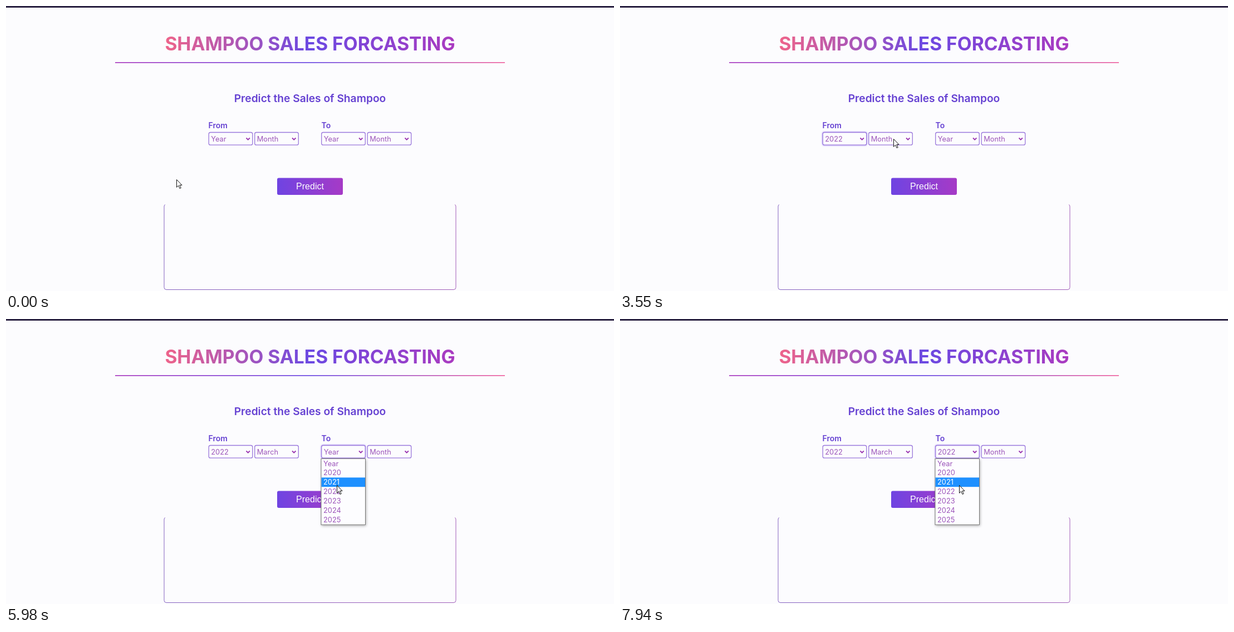
Write an HTML page that moves like this. It is 1092 px wide and 513 px high and loops after 7990 ms.

```html
<!DOCTYPE html>
<html lang="en">
<head>
<meta charset="utf-8">
<title>Sales forecast form</title>
<style>
html, body { margin: 0; width: 100%; height: 100%; overflow: hidden; background: #fcfcfe; }
svg { display: block; width: 1092px; height: 513px; font-family: Inter, sans-serif; }
.option { font-size: 12.8px; font-weight: 400; fill: #9c55ba; }
.label { font-size: 14px; font-weight: 600; fill: #6541d2; }
</style>
</head>
<body>
<svg id="stage" viewBox="0 0 1092 513" xmlns="http://www.w3.org/2000/svg">
  <defs>
    <linearGradient id="titleFill" gradientUnits="userSpaceOnUse" x1="285" x2="807" y1="0" y2="0">
      <stop offset="0" stop-color="#ef648a"/><stop offset=".5" stop-color="#6b49e2"/><stop offset="1" stop-color="#aa3bc0"/>
    </linearGradient>
    <linearGradient id="lineFill" gradientUnits="userSpaceOnUse" x1="196" x2="896" y1="0" y2="0">
      <stop offset="0" stop-color="#aa3bc0"/><stop offset=".5" stop-color="#6b49e2"/><stop offset="1" stop-color="#ef64a0"/>
    </linearGradient>
    <linearGradient id="buttonFill"><stop stop-color="#6f44e2"/><stop offset="1" stop-color="#a63ac6"/></linearGradient>
    <linearGradient id="frameLine" gradientUnits="userSpaceOnUse" x1="284" x2="808" y1="0" y2="0">
      <stop stop-color="#8462c0"/><stop offset="1" stop-color="#a05cb8"/>
    </linearGradient>
    <filter id="shadow" x="-20%" y="-20%" width="140%" height="140%">
      <feDropShadow dx="1" dy="2" stdDeviation="2.4" flood-color="#000" flood-opacity=".36"/>
    </filter>
    <filter id="glow" x="-20%" y="-50%" width="140%" height="200%"><feGaussianBlur stdDeviation="1"/></filter>
  </defs>
  <rect width="1092" height="513" fill="#fcfcfe"/>
  <rect width="1092" height="3" fill="#2e2645"/>
  <text x="546" y="80.3" text-anchor="middle" font-size="33.6" font-weight="700" fill="url(#titleFill)">SHAMPOO SALES FORCASTING</text>
  <rect x="196" y="101" width="700" height="1.7" fill="url(#lineFill)"/>
  <text x="546" y="173.2" text-anchor="middle" font-size="19.2" font-weight="600" fill="#6541d2">Predict the Sales of Shampoo</text>
  <text class="label" x="363.5" y="220.3">From</text>
  <text class="label" x="566.5" y="220.3">To</text>
  <g id="fields"></g>
  <rect x="487" y="309.5" width="118" height="30.5" rx="3" fill="url(#buttonFill)"/>
  <text x="546" y="330" text-anchor="middle" font-size="16" fill="#fff" style="font-family:'Liberation Sans',Arial,sans-serif">Predict</text>
  <path d="M286 357.5Q284 358 284 361V506.500Q284 510.500 288 510.500H804Q808 510.500 808 506.500V361Q808 358 806 357.500" fill="none" stroke="url(#frameLine)"/>
  <g id="popup"></g>
  <path id="cursor" d="M.5 .5V14.300L3.700 11.200L6 16.500L8.200 15.500L5.900 10.400H10Z" fill="#fff" stroke="#111" stroke-width="1" stroke-linejoin="miter"/>
</svg>
<script>
const NS = 'http://www.w3.org/2000/svg';
const LOOP = 7990, TOP = 251.3, ROW = 16.83;
const years = ['Year', '2020', '2021', '2022', '2023', '2024', '2025'];
const months = ['Month', 'January', 'February', 'March', 'April', 'May', 'June', 'July',
  'August', 'September', 'October', 'November', 'December'];

// time, x, y of the pointer
const path = [
  [130, 306, 312], [710, 408, 236], [880, 408, 236], [920, 407, 240], [1460, 407, 240],
  [1920, 402, 297], [2300, 402, 297], [2630, 404, 312], [2930, 404, 312], [3550, 491, 239],
  [3760, 491, 239], [4220, 488, 311], [4720, 488, 311], [5060, 581, 245], [5320, 592, 240],
  [5520, 592, 240], [5980, 594, 299], [6150, 594, 299], [6230, 595, 312], [6650, 595, 312],
  [7440, 611, 236], [7650, 611, 236], [7940, 609, 299]
];

// each time a list is open: which field, its starting row, the row chosen
const sessions = [
  { field: 0, open: 1420, close: 2930, start: 0, pick: 3 },
  { field: 1, open: 3720, close: 4720, start: 0, pick: 3 },
  { field: 2, open: 5480, close: 6650, start: 0, pick: 3 },
  { field: 2, open: 7610, close: LOOP, start: 3, pick: 3 }
];

function add(parent, tag, attrs, text) {
  const el = document.createElementNS(NS, tag);
  for (const k in attrs) el.setAttribute(k, attrs[k]);
  if (text) el.textContent = text;
  parent.appendChild(el);
  return el;
}

const show = (el, on) => el.setAttribute('visibility', on ? 'visible' : 'hidden');
const fieldLayer = document.getElementById('fields');
const popLayer = document.getElementById('popup');
const cursor = document.getElementById('cursor');

const fields = [364, 446.5, 566.5, 649].map((x, i) => {
  const items = i % 2 ? months : years;
  const box = { x: x + .2, y: 227.5, width: 78.6, height: 22.7, rx: 3 };
  const glow = add(fieldLayer, 'rect', { ...box, fill: 'none', stroke: '#8f70f0', 'stroke-width': 3, opacity: .5, filter: 'url(#glow)' });
  add(fieldLayer, 'rect', { ...box, fill: '#fcfcfe', stroke: '#9a78dc', 'stroke-width': 1.3 });
  const label = add(fieldLayer, 'text', { class: 'option', x: x + 4.3, y: 243.8 }, items[0]);
  add(fieldLayer, 'path', { d: `M${x + 67.5} 237.500l3.200 3.200l3.200-3.200`, fill: 'none', stroke: '#9a35b0', 'stroke-width': 1.8 });
  return { x, items, glow, label };
});

const lists = fields.slice(0, 3).map(f => {
  const g = add(popLayer, 'g', {});
  const height = ROW * f.items.length + 1;
  add(g, 'rect', { x: f.x - .5, y: TOP, width: 79.5, height, fill: '#fdfdff', filter: 'url(#shadow)' });
  const full = add(g, 'g', {});
  add(full, 'rect', { x: f.x - .5, y: TOP + .2, width: 79.5, height, fill: 'none', stroke: '#777' });
  const bar = add(full, 'rect', { x: f.x, width: 78.5, height: ROW, fill: '#1e90ff' });
  const rows = f.items.map((s, i) =>
    add(full, 'text', { class: 'option', x: f.x + 3.5, y: TOP + 13.3 + ROW * i }, s));
  return { g, full, bar, rows };
});

function pointer(t) {
  let i = 0;
  while (i < path.length - 1 && path[i + 1][0] <= t) i++;
  const a = path[i], b = path[i + 1] || a;
  const u = Math.min(1, Math.max(0, (t - a[0]) / (b[0] - a[0] || 1)));
  const e = u * u * (3 - 2 * u);
  return [a[1] + (b[1] - a[1]) * e, a[2] + (b[2] - a[2]) * e];
}

function draw(t) {
  const [x, y] = pointer(t).map(Math.round);
  cursor.setAttribute('transform', `translate(${x} ${y})`);

  const value = [0, 0, 0, 0];
  let focus = -1, live = null;
  for (const s of sessions) {
    if (t >= s.open) focus = s.field;
    if (t >= s.close) value[s.field] = s.pick;
    else if (t >= s.open) live = s;
  }
  fields.forEach((f, i) => {
    f.label.textContent = f.items[value[i]];
    show(f.glow, i === focus);
  });
  lists.forEach((l, i) => {
    const on = live && live.field === i;
    l.g.setAttribute('display', on ? 'inline' : 'none');
    if (!on) return;
    // the list appears blank for one step before its rows
    l.full.setAttribute('display', t < live.open + 40 ? 'none' : 'inline');
    const row = y > TOP ? Math.floor((y - TOP) / ROW) : live.start;
    l.bar.setAttribute('y', TOP + .4 + row * ROW);
    l.rows.forEach((r, k) => { r.style.fill = k === row ? '#fff' : ''; });
  });
}

const begin = performance.now();
function tick() {
  draw((performance.now() - begin) % LOOP);
  requestAnimationFrame(tick);
}
draw(0);
tick();
</script>
</body>
</html>
```
